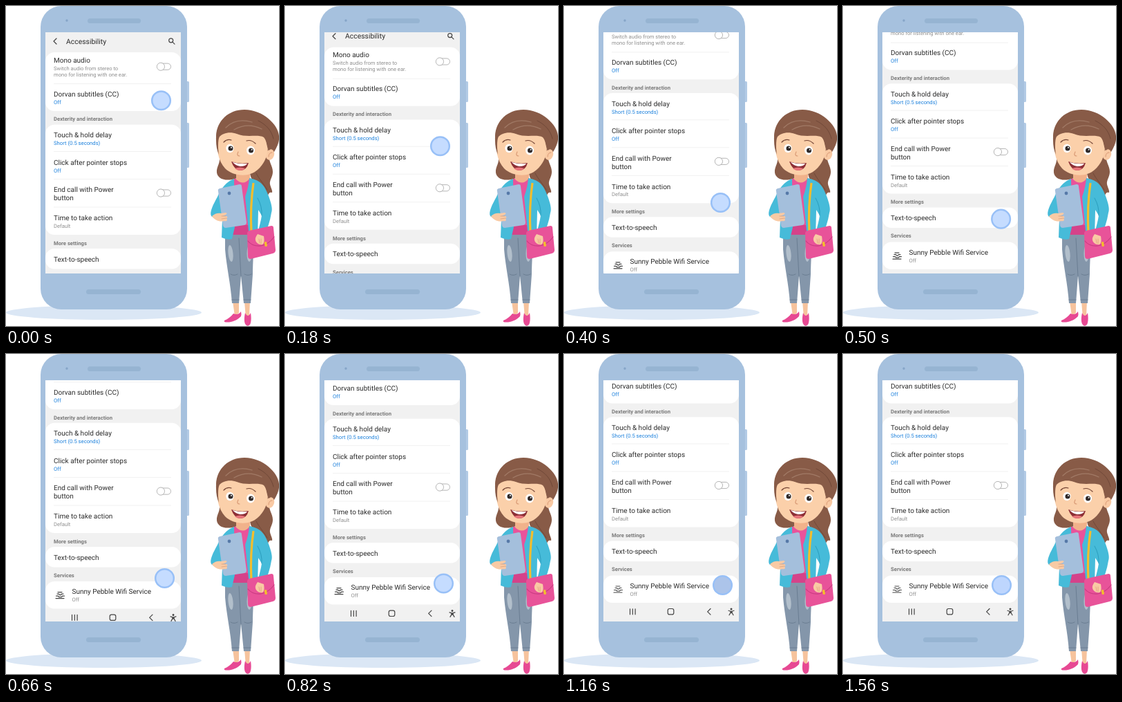
Animation of 395x463 px, one loop 1800 ms. Source, as an HTML page:

```html
<!DOCTYPE html>
<html lang="en">
<head>
<meta charset="utf-8">
<title>Accessibility settings</title>
<style>
html, body { margin: 0; width: 100%; height: 100%; overflow: hidden; background: #fff; }
svg { display: block; width: 395px; height: 463px; }
text { font-family: Roboto, sans-serif; text-rendering: geometricPrecision; }
.title { font-size: 10px; fill: #2b2b2b; }
.note { font-size: 7.6px; fill: #8f8f8f; }
.blue { font-size: 7.7px; fill: #1c80dc; }
.section { font-size: 7.7px; fill: #7a7a7a; font-weight: 700; }
.line { fill: none; stroke: #444; stroke-width: 1.2; stroke-linecap: round; stroke-linejoin: round; }
.thin { fill: none; stroke-linecap: round; }
</style>
</head>
<body>
<svg viewBox="0 0 395 463" xmlns="http://www.w3.org/2000/svg">
  <defs>
    <clipPath id="screen"><rect x="57" y="38" width="196" height="349"/></clipPath>
    <g id="toggle" fill="#fff" stroke="#adadad" stroke-width=".9">
      <rect x="-9" y="-4.6" width="19" height="9.2" rx="4.6"/>
      <circle cx="-4.6" r="5.6"/>
    </g>
  </defs>

  <!-- phone -->
  <ellipse cx="141.500" cy="443.500" rx="141.500" ry="10.500" fill="#dbe7f5"/>
  <path d="M261 109h2.500q1.500 0 1.500 1.500v27q0 1.500-1.500 1.500H261zM261 169h2.500q1.500 0 1.500 1.500v62q0 1.500-1.500 1.500H261z" fill="#b3cbe5"/>
  <rect x="50" y="0" width="212" height="439" rx="30" fill="#a6c1de"/>
  <circle cx="88" cy="21" r="1.700" fill="#86a5c7"/>
  <rect x="118" y="18" width="77" height="7" rx="3.500" fill="#96b4d2"/>
  <rect x="116" y="410" width="79" height="7" rx="3.500" fill="#96b4d2"/>

  <g clip-path="url(#screen)">
    <rect x="57" y="38" width="196" height="349" fill="#f1f1f1"/>
    <g id="page">
      <path class="line" d="M73 47l-4 4 4 4"/>
      <text x="87" y="54.700" class="title" style="font-size:10.4px">Accessibility</text>
      <circle class="line" cx="238.700" cy="49.800" r="3"/>
      <path class="line" d="M241 52.200l3 3"/>
      <g id="cards" fill="#fff"></g>
      <g id="rules" stroke="#f1f1f1" stroke-width="1"></g>
      <g id="labels"></g>
      <use href="#toggle" x="228.500" y="87.700"/>
      <use href="#toggle" x="228.500" y="270.500"/>
      <path class="line" d="M75 416.500h6M74 419h2.500l1 1.500h2l1-1.500h2.500M72.500 422h3l1 1.500h4l1-1.500h3M72 425.500h12"/>
      <g class="line">
        <path d="M95.500 449.300v8M99.300 449.300v8M103.100 449.300v8"/>
        <rect x="150.200" y="449" width="8.600" height="8.400" rx="2.500"/>
        <path d="M212 449l-4.300 4.300 4.300 4.300"/>
        <path d="M238 451.800l3 1h2l3-1M241 453.300l-.3 2-1.700 3M243 453.300l.3 2 1.700 3M242 452.800v2.500"/>
        <circle cx="242" cy="449.500" r=".9" fill="#444"/>
      </g>
    </g>
    <circle id="dot" r="13.300" fill="#c5dcff" stroke="#98c0f7" stroke-width="2.500"/>
  </g>

  <!-- woman -->
  <g>
    <!-- hair behind -->
    <g fill="#885b47">
      <path d="M345 150C322 150 305 166 304 188C304 200 309 208 316 216L372 236L386 214C391 206 396 198 395 188C394 172 372 150 345 150Z"/>
      <path d="M308 216C312 226 304 232 305 241C306 250 318 255 334 249L330 226Z"/>
      <path d="M381 218C380 226 386 231 386 240C386 247 381 252 382 258C383 263 386 267 385 270C382 269 380 270 378 277C371 273 371 265 364 259C358 255 354 250 353 242L368 226Z"/>
    </g>
    <path d="M362 242C366 250 372 256 378 266" class="thin" stroke="#704838" stroke-width="1"/>
    <!-- legs -->
    <path d="M328 427h9v17l-6 5zM345 427h8l-1 22-5 3z" fill="#f6c39d"/>
    <path d="M317 331H358C359 352 357 370 357 388L354 430H344L340 390L337 430H327C325 402 319 377 317 352Z" fill="#8496aa"/>
    <g fill="#b2bfcb">
      <ellipse cx="325" cy="358" rx="3.500" ry="12" transform="rotate(-6 325 358)"/>
      <ellipse cx="352" cy="358" rx="3.500" ry="12"/>
    </g>
    <path d="M337 336L340 391M325 388q5 3 10 0M345 388q5 3 10 0M327 425h10M344 425h10" class="thin" stroke="#6a7d92" stroke-width="1"/>
    <path d="M316 455C321 453 326 449 329 445Q336 448 340 442Q341 446 340 449C334 455 327 458 318 457.500Q315 457 316 455Z" fill="#e74993"/>
    <path d="M346 444Q350 452 354 444C355 450 355 457 353 461Q349 465 346 460C344 455 345 449 346 444Z" fill="#e74993"/>
    <!-- torso -->
    <path d="M329 250L354 249L353 331H328Z" fill="#e9539b"/>
    <path d="M326 317H353V331H328Z" fill="#d5428a"/>
    <path d="M333 240H353V249Q344 261 333 251Z" fill="#f1b28b"/>
    <path d="M330 250C319 254 311 264 306 276C300 287 294 298 297 304C303 309 310 309 313 308L312 335Q321 339 327 337L331 320Z" fill="#46bbd9"/>
    <path d="M352 249C370 252 375 262 380 275C384 286 386 294 384 299C382 312 378 323 373 334L364 330C366 320 369 311 370 303L365 295L364 336Q357 338 352 335L346 276Q351 262 352 249Z" fill="#46bbd9"/>
    <path d="M370 303Q371 290 364 278M313 308Q311 298 316 288" class="thin" stroke="#2b9dbd" stroke-width="1"/>
    <!-- bag and strap -->
    <path d="M358 256Q353 290 355 328" fill="none" stroke="#f4be2d" stroke-width="3.200"/>
    <path d="M349 329Q349 326 352 325L384 318Q387 318 387 321L390 353Q390 357 386 358L354 366Q350 366 350 362Z" fill="#e85399"/>
    <path d="M350 340Q356 348 369 347Q380 345 388 334" class="thin" stroke="#c93a80" stroke-width="1.200"/>
    <path d="M364 330L373 333C374 339 374 343 371 345C367 346 362 343 361 339C360 336 362 333 364 330Z" fill="#f9caa4"/>
    <path d="M366 337l1 6M369 337v7" class="thin" stroke="#d99a75" stroke-width=".7"/>
    <rect x="374" y="341" width="3.500" height="7" rx="1.500" fill="#f4be2d" transform="rotate(-10 376 344)"/>
    <!-- tablet -->
    <path d="M309 264L338 258Q341 258 341 261L348 313Q348 316 345 317L318 321Q315 321 314 318L307 268Q306 265 309 264Z" fill="#a4bfdc"/>
    <circle cx="323" cy="271" r="2.400" fill="#5679a8"/>
    <path d="M298 304C302 300 307 299 311 300L318 299Q321 300 318 302L313 304L319 304Q322 306 319 307L320 309Q320 312 316 311C309 313 302 310 298 304Z" fill="#f9caa4"/>
    <path d="M312 304l6 0M312 308l7-1" class="thin" stroke="#d99a75" stroke-width=".7"/>
    <!-- face -->
    <ellipse cx="382" cy="215" rx="6" ry="8" fill="#f9caa4" transform="rotate(18 382 215)"/>
    <path d="M380 218q0-6 5-6" class="thin" stroke="#d99a75" stroke-width="1"/>
    <path d="M306 190C304 207 307 224 317 235C328 246 351 249 364 237C373 229 378 219 379 205L373 181L334 172Z" fill="#fbd0aa"/>
    <path d="M304 195C303 174 320 156 345 154C364 153 381 169 386 189C389 199 386 206 380 209C377 204 378 196 373 190C365 185 348 191 334 185C324 181 313 184 309 189C306 194 307 209 308 215C305 208 304 202 304 195Z" fill="#885b47"/>
    <path d="M318 176C328 166 342 164 356 168M330 179C344 171 358 172 370 178" class="thin" stroke="#a17a66" stroke-width="1.300"/>
    <path d="M365 166C377 172 384 180 387 192" class="thin" stroke="#704838" stroke-width="1"/>
    <path d="M315 197Q320 192 326 194M348 195Q355 193 361 199" class="thin" stroke="#744536" stroke-width="1.200"/>
    <g fill="#fff">
      <ellipse cx="324" cy="206" rx="5.600" ry="6.200"/>
      <ellipse cx="354" cy="209" rx="6" ry="6.400"/>
    </g>
    <g fill="#302928">
      <circle cx="325" cy="206" r="3.500"/>
      <circle cx="354.500" cy="209" r="3.500"/>
    </g>
    <g fill="#fff">
      <circle cx="326" cy="204.800" r="1"/>
      <circle cx="355.700" cy="207.800" r="1"/>
    </g>
    <path d="M336 211Q333 217 338 217" class="thin" stroke="#d99a75" stroke-width="1.200"/>
    <path d="M326 225Q337 229 351 227Q348 238 339 238Q330 237 326 225Z" fill="#8d2f36"/>
    <path d="M328 226Q338 229 349 228Q347 232 339 232Q332 231 328 226Z" fill="#fff"/>
    <path d="M331 235Q339 232 346 235Q344 238 339 238Q334 238 331 235Z" fill="#e7747a"/>
  </g>
</svg>
<script>
const LOOP = 1800, SCROLL = 80.5, SCROLL_MS = 1060;
const $ = id => document.getElementById(id);

// top, bottom
$('cards').innerHTML = [[67, 152], [171.7, 331], [351, 380.5], [401, 440.5]]
  .map(([a, b]) => `<rect x="57" y="${a}" width="196" height="${b - a}" rx="13"/>`).join('');
$('rules').innerHTML = [112.5, 210.5, 250.5, 291]
  .map(y => `<path d="M69 ${y}H239"/>`).join('');
// class, baseline, text, left
$('labels').innerHTML = [
  ['title', 81.6, 'Mono audio'],
  ['note', 92.7, 'Switch audio from stereo to'],
  ['note', 101.7, 'mono for listening with one ear.'],
  ['title', 130.6, 'Dorvan subtitles (CC)'],
  ['blue', 141.6, 'Off'],
  ['section', 166.5, 'Dexterity and interaction'],
  ['title', 190.2, 'Touch &amp; hold delay'],
  ['blue', 201.2, 'Short (0.5 seconds)'],
  ['title', 229.7, 'Click after pointer stops'],
  ['blue', 240.7, 'Off'],
  ['title', 269.2, 'End call with Power'],
  ['title', 281.2, 'button'],
  ['title', 310.2, 'Time to take action'],
  ['note', 321, 'Default'],
  ['section', 345.8, 'More settings'],
  ['title', 369.7, 'Text-to-speech'],
  ['section', 394.8, 'Services'],
  ['title', 419, 'Sunny Pebble Wifi Service', 95.5],
  ['note', 430, 'Off', 95.5]
].map(([c, y, s, x = 69]) => `<text class="${c}" x="${x}" y="${y}">${s}</text>`).join('');

const clamp = v => Math.min(1, Math.max(0, v));
const mix = (a, b, k) => a + (b - a) * k;

// cubic-bezier(.4, 0, .2, 1)
function ease(x) {
  if (x <= 0 || x >= 1) return clamp(x);
  let lo = 0, hi = 1, u = .5;
  for (let i = 0; i < 24; i++) {
    u = (lo + hi) / 2;
    const v = 1 - u;
    if (1.2 * v * v * u + .6 * v * u * u + u * u * u < x) lo = u; else hi = u;
  }
  return 3 * (1 - u) * u * u + u * u * u;
}

// Hermite curve through [time, value, slope]
function along(keys, t) {
  const i = keys.findIndex(k => k[0] > t);
  if (i < 0) return keys[keys.length - 1][1];
  const [t0, a, m] = keys[i - 1], [t1, b, n] = keys[i];
  const d = t1 - t0, u = (t - t0) / d, w = u * u * (3 - 2 * u);
  return mix(a, b, w) + d * u * (1 - u) * (m * (1 - u) - n * u);
}

const pathX = [[0, 224.5, 0], [280, 224.5, 0], [500, 228.6, .012], [660, 229.5, 0]];
const pathY = [[0, 136.5, .3], [300, 250, .38], [500, 308, .17],
  [660, 324.5, .07], [820, 332, .025], [1080, 334.5, 0]];

// press: quick darkening, then a slow return
function tint(t) {
  const press = clamp((t - 1080) / 80) * (1 - clamp((t - 1200) / 360));
  const base = clamp((t - 1080) / 480);
  const rgb = [[197, 190, 172], [220, 214, 196], [255, 254, 234]]
    .map(([a, b, c]) => Math.round(mix(mix(a, b, base), c, press)));
  return `rgb(${rgb})`;
}

function draw(t) {
  $('page').setAttribute('transform', `translate(0 ${-SCROLL * ease(t / SCROLL_MS)})`);
  $('dot').setAttribute('transform', `translate(${along(pathX, t)} ${along(pathY, t)})`);
  $('dot').setAttribute('fill', tint(t));
}

const start = performance.now();
function tick(now) {
  draw(Math.max(0, now - start) % LOOP);
  requestAnimationFrame(tick);
}
draw(0);
requestAnimationFrame(tick);
</script>
</body>
</html>
```
